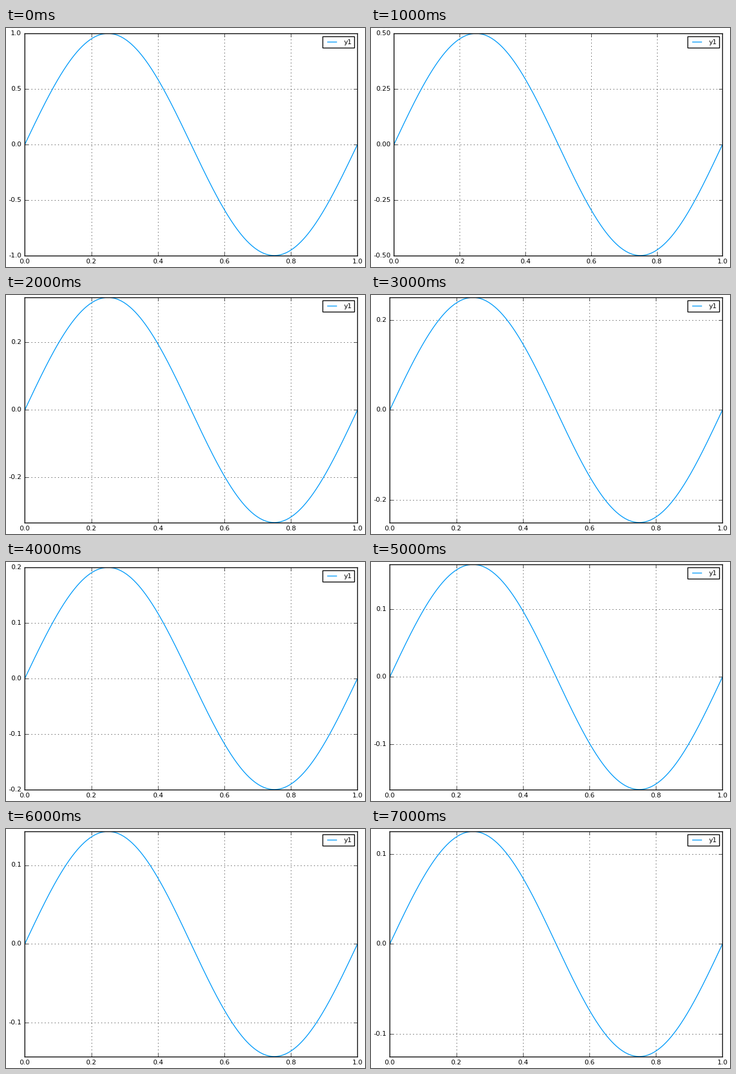
Recreate the animation shown at these times as a matplotlib script. Size 600 by 400 pixels, loop 8000 ms.

```python
import matplotlib.pyplot as plt
import numpy as np
from matplotlib.animation import FuncAnimation

W, H, DPI = 600, 400, 100
RIGHT, BOTTOM = 587.4, 380.8
STEPS = [0.5, 0.25, 0.2, 0.2, 0.1, 0.1, 0.1, 0.1]  # y tick spacing per amplitude

plt.rcParams.update({
    "font.family": "DejaVu Sans",
    "font.size": 8,
    "axes.linewidth": 1,
    "axes.axisbelow": True,
    "axes.grid": True,
    "grid.color": "black",
    "grid.linewidth": 0.5,
    "grid.linestyle": ":",
    "lines.dotted_pattern": [1, 3],
    "lines.scale_dashes": False,
    "xtick.labelbottom": False,
    "ytick.labelleft": False,
    "xtick.top": True,
    "ytick.right": True,
})
for axis in ("xtick", "ytick"):
    plt.rcParams.update({
        f"{axis}.direction": "in",
        f"{axis}.major.size": 4,
        f"{axis}.major.width": 0.5,
    })

fig = plt.figure(figsize=(W / DPI, H / DPI), dpi=DPI, facecolor="white")
ax = fig.add_axes([0, 0, 1, 1])
x = np.linspace(0, 1, 401)


def place_axes(left, top):
    ax.set_position([left / W, 1 - BOTTOM / H,
                     (RIGHT - left) / W, (BOTTOM - top) / H])


def label(text, xy, coords, offset, ha):
    ax.annotate(text, xy, xycoords=coords, xytext=offset,
                textcoords="offset pixels", ha=ha, va="baseline")


def draw(i):
    amp, step = 1 / (i + 1), STEPS[i]
    count = int(amp / step + 1e-9)
    yticks = np.arange(-count, count + 1) * step
    xticks = np.arange(6) / 5
    digits = 2 if step == 0.25 else 1
    ends_labelled = abs(count * step - amp) < 1e-9

    ax.clear()
    # Wider labels push the left edge in; a label at the limit lowers the top.
    place_axes(38.4 if digits == 2 else 31.4, 9.1 if ends_labelled else 4.1)
    ax.plot(x, amp * np.sin(2 * np.pi * x), color="#009AFA", lw=1, label="y1")
    ax.set(xlim=(0, 1), ylim=(-amp, amp), xticks=xticks, yticks=yticks)

    for t in xticks:
        label(f"{t:.1f}", (t, 0), ax.get_xaxis_transform(), (0, -13.2), "center")
    for t in yticks:
        label(f"{t:.{digits}f}", (0, t), ax.get_yaxis_transform(),
              (-5.56, -2.75), "right")

    ax.legend(loc="upper right", fontsize=8, numpoints=2, fancybox=False,
              framealpha=1, facecolor="white", edgecolor="black",
              borderaxespad=0.45)
    return []


anim = FuncAnimation(fig, draw, frames=8, init_func=lambda: [],
                     interval=1000, repeat=True, repeat_delay=0)
plt.show()
```
